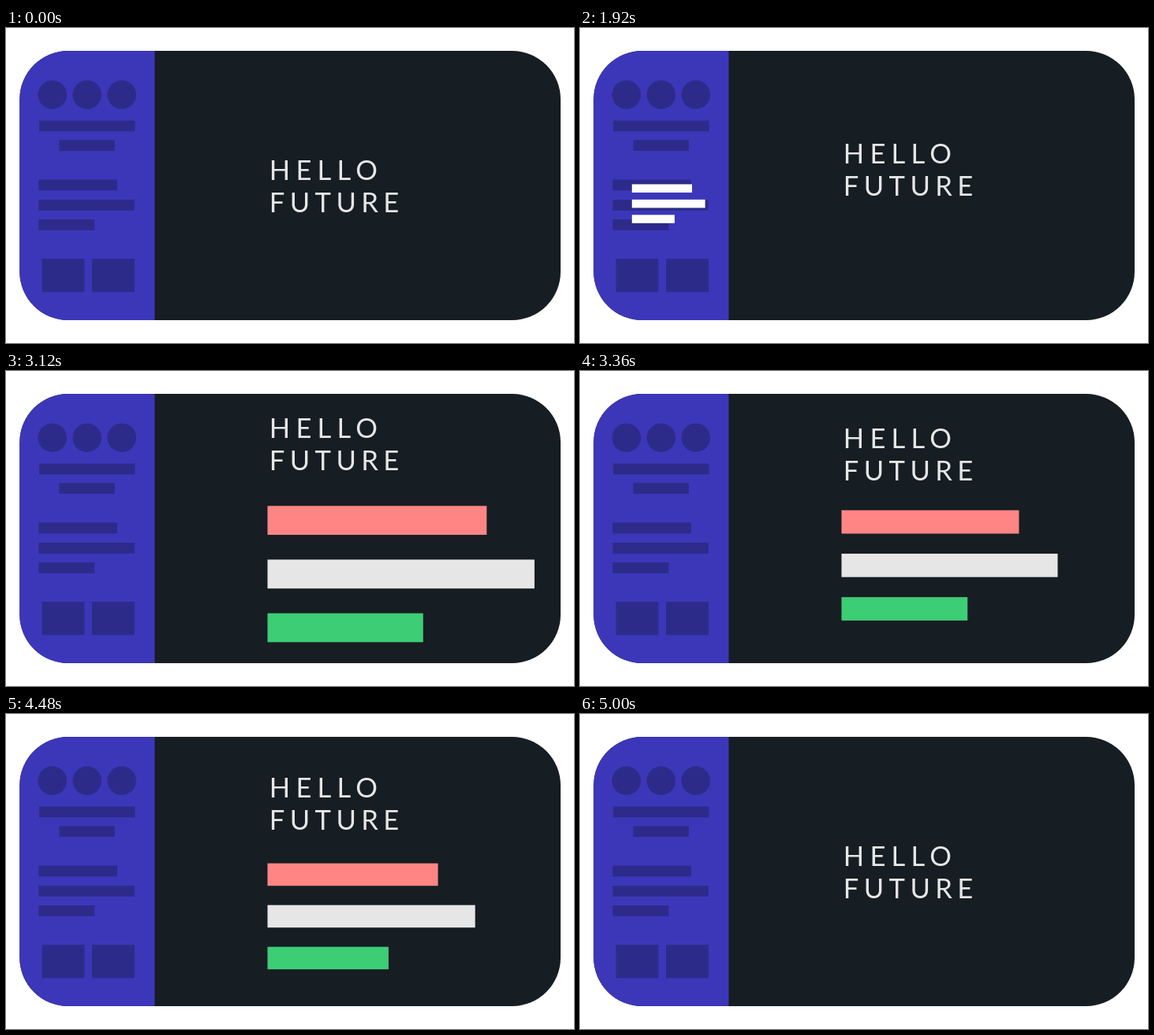
An HTML page with a canvas for the animation above (5.16 s loop, 720 by 400 pixels).

```html
<!DOCTYPE html>
<html lang="en">
<head>
<meta charset="utf-8">
<title>Hello Future</title>
<style>
  html, body { margin: 0; width: 100%; height: 100%; overflow: hidden; background: #fff; }
  canvas { display: block; width: 720px; height: 400px; }
</style>
</head>
<body>
<canvas id="stage" width="720" height="400"></canvas>
<script>
const ctx = document.getElementById('stage').getContext('2d');
const LOOP = 5160, STEP = 40;

const clamp = v => Math.min(1, Math.max(0, v));
const lerp = (a, b, p) => a + (b - a) * p;
const span = (t, start, length) => clamp((t - start) / length);
const expoOut = p => p >= 1 ? 1 : 1 - 2 ** (-10 * p);
const smooth = p => p * p * (3 - 2 * p);
const inOut = (p, n) => p < 0.5 ? (2 * p) ** n / 2 : 1 - (2 - 2 * p) ** n / 2;

const WHITE = [255, 255, 255];
const BARS = [
  { width: 0.821, color: [255, 133, 133] },
  { width: 1, color: [230, 230, 230] },
  { width: 0.583, color: [61, 205, 117] }
];
const mix = (a, b, p) => `rgb(${a.map((v, i) => Math.round(lerp(v, b[i], p)))})`;

function rect(color, x, y, w, h) {
  ctx.fillStyle = color;
  ctx.fillRect(x, y, w, h);
}

function drawSidebar() {
  const dark = '#2d2b8a';
  rect('#3c37b9', 17, 29, 171.5, 342);
  ctx.fillStyle = dark;
  for (const x of [58.8, 102.8, 146.8]) {
    ctx.beginPath();
    ctx.arc(x, 84.7, 18.3, 0, 2 * Math.PI);
    ctx.fill();
  }
  rect(dark, 42, 117.5, 121.5, 13.8);
  rect(dark, 67.5, 142.2, 70.5, 13.8);
  rect(dark, 41.3, 192.5, 99.7, 13.8);
  rect(dark, 41.3, 218, 121.5, 13.8);
  rect(dark, 41.3, 243, 71, 13.8);
  rect(dark, 45.5, 293, 53.8, 42.3);
  rect(dark, 109, 293, 54, 42.3);
}

// Overshoot: rises until 3080 ms, then relaxes with a long tail.
function overshoot(t, width) {
  if (t < 3080) return smooth(span(t, 2960, 120));
  const tail = d => 1 / (1 + (d / width) ** 2);
  return Math.max(0, tail(t - 3080) - tail(1000));
}

function drawText(t) {
  const up = inOut(span(t, 1685, 578), 4);
  const down = inOut(span(t, 4280, 755), 3);
  const y = 93.5 * (down - up) - 20 * overshoot(t, 61);
  ctx.font = '34.6px Lato, "Open Sans", sans-serif';
  ctx.fillStyle = '#e6e6e6';
  ctx.letterSpacing = '7.2px';
  ctx.fillText('HELLO', 333.8, 192.8 + y);
  ctx.letterSpacing = '6.4px';
  ctx.fillText('FUTURE', 333.8, 233.8 + y);
}

function drawBars(t) {
  const lift = expoOut(span(t, 1000, 560));
  if (!lift) return;
  const drag = inOut(span(t, 1692, 813), 4);
  const grow = smooth(span(t, 2960, 120));
  const fall = inOut(span(t, 4300, 755), 3);
  const extra = t < 3080 ? grow : overshoot(t, 112);

  const x = lerp(lerp(42, 52, lift), 331.5, drag);
  const y = lerp(lerp(192.5, 199.5, lift), 177.7, drag) - 7.3 * extra + 220 * fall;
  const size = lerp(lerp(121.3, 92.8, lift), 263.2, grow) + 86 * extra;
  const height = size * lerp(0.1135, 0.1085, grow);
  const pitch = size * lerp(0.2095, 0.2014, grow);

  ctx.globalAlpha = lift;
  BARS.forEach((bar, i) =>
    rect(mix(WHITE, bar.color, grow), x, y + i * pitch, size * bar.width, height));
  ctx.globalAlpha = 1;
}

function draw(t) {
  ctx.clearRect(0, 0, 720, 400);
  ctx.save();
  ctx.beginPath();
  ctx.roundRect(17.3, 29, 685.7, 342, 61.5);
  ctx.clip();
  rect('#161d23', 17, 29, 687, 342);
  drawSidebar();
  drawText(t);
  drawBars(t);
  ctx.restore();
}

const begin = performance.now();
function frame() {
  const t = (performance.now() - begin) % LOOP;
  draw(Math.floor(t / STEP) * STEP);
  requestAnimationFrame(frame);
}
frame();
</script>
</body>
</html>
```
